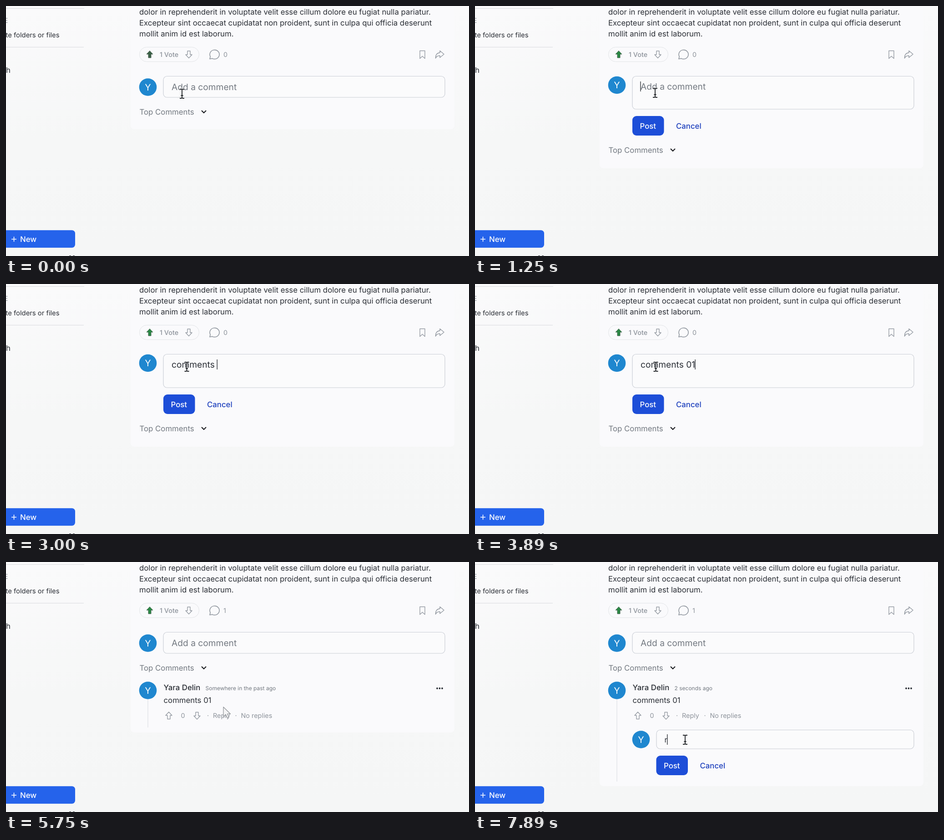
Write an HTML page that moves like this. It is 1018 px wide and 550 px high and loops after 8000 ms.

```html
<!DOCTYPE html>
<html lang="en">
<head>
<meta charset="utf-8">
<title>Comment thread</title>
<style>
html, body { margin: 0; width: 100%; height: 100%; overflow: hidden; background: #f6f7f7; }
svg { display: block; width: 1018px; height: 550px; }
text { font: 16.8px Inter, "Noto Sans", sans-serif; fill: #2a2e35; white-space: pre; text-rendering: geometricPrecision; }
.input { font-size: 19.2px; }
.small { font-size: 14.4px; }
.side { font-size: 14.8px; }
.tiny { font-size: 12px; }
.medium { font-weight: 500; }
.muted { fill: #737981; }
.soft { fill: #8d939b; }
.white { fill: #fff; }
.link { fill: #1e40bd; }
.avatar circle { fill: #1f87cf; }
.avatar text { font-size: 19.8px; fill: #fff; text-anchor: middle; }
.icon { fill: none; stroke: #969ca4; stroke-width: 1.4; stroke-linejoin: round; stroke-linecap: round; }
.field { fill: #fbfbfc; stroke: #cbcfd6; stroke-width: 1.2; }
.rule { stroke: #d9dbdf; }
.caret { stroke: #30343a; stroke-width: 1.4; }
</style>
</head>
<body>
<svg viewBox="0 0 1018 550">
  <defs>
    <linearGradient id="page" x2="0" y2="1">
      <stop stop-color="#fafafb"/>
      <stop offset=".55" stop-color="#f6f7f7"/>
      <stop offset="1" stop-color="#f5f6f6"/>
    </linearGradient>
    <path id="up" d="M0-8 7-.5H3V7.5H-3V-.5H-7Z"/>
    <path id="chevron" d="M-5-2.5 0 2.5 5-2.5" fill="none" stroke="#17191d" stroke-width="2"/>
    <g id="avatar" class="avatar"><circle r="19.3"/><text y="7">Y</text></g>
    <g id="post">
      <rect width="69.5" height="43" rx="9" fill="#1d4ed8"/>
      <text class="medium white" x="16.5" y="27.5">Post</text>
      <text class="medium link" x="96" y="27.5">Cancel</text>
    </g>
  </defs>
  <rect width="1018" height="550" fill="url(#page)"/>

  <!-- sidebar -->
  <path class="rule" d="M0 5.5H172M0 90.5H171"/>
  <text class="small soft" x="4.5" y="36.5" text-anchor="end">E</text>
  <text class="side" x="117.5" y="69" text-anchor="end">te folders or files</text>
  <text x="10" y="147" text-anchor="end">h</text>
  <rect x="-20" y="493.3" width="172" height="38.4" rx="7" fill="#2563eb"/>
  <path d="M12 513H23M17.5 507.5V518.5" stroke="#fff" stroke-width="1.6"/>
  <text class="medium white" x="31" y="518.5">New</text>
  <path d="M139 549.5H143M147 549.5H151" stroke="#2a2e35"/>

  <!-- post -->
  <rect id="card" x="274" y="-20" width="712" rx="8" fill="#fafafc"/>
  <text x="293" y="19">dolor in reprehenderit in voluptate velit esse cillum dolore eu fugiat nulla pariatur.</text>
  <text x="293" y="43">Excepteur sint occaecat cupidatat non proident, sunt in culpa qui officia deserunt</text>
  <text x="293" y="67">mollit anim id est laborum.</text>
  <rect x="293.5" y="90.5" width="131" height="32" rx="16" fill="none" stroke="#e2e4e7"/>
  <use id="vote" href="#up" x="316" y="106.5" stroke-width=".8"/>
  <text class="small soft medium" x="338" y="111.5">1 Vote</text>
  <use class="icon" href="#up" transform="translate(402 106.5) rotate(180)"/>
  <path class="icon" style="stroke-width:1.7" d="M448 116.5 449.3 111.3A10.5 10 0 1 1 453.5 115.4Z"/>
  <text id="count" class="small soft" x="478" y="111.5"></text>
  <path class="icon" d="M910 98.5H921V115.5L915.5 110.5 910 115.5Z"/>
  <path class="icon" style="stroke-width:1.5" d="M954 98.5 963 106 954 113.5V109.3C949 109 946.5 111 944.5 115 944.5 107 948 103 954 102.7Z"/>

  <!-- comment box -->
  <use id="me" href="#avatar" x="312"/>
  <rect id="box" class="field" x="346" y="154.5" width="619" rx="8"/>
  <text id="draft" class="input" x="364"></text>
  <line id="caret" class="caret" y1="166" y2="188"/>
  <use id="boxPost" href="#post" x="346"/>
  <g id="sort">
    <text class="muted" x="293.5" y="6">Top Comments</text>
    <use href="#chevron" x="435" y="0"/>
  </g>

  <!-- posted comment -->
  <g id="thread">
    <line id="stem" x1="312" x2="312" y1="302" stroke="#d7dade"/>
    <use href="#avatar" x="312" y="282.5"/>
    <text class="medium" x="346.5" y="281.5">Yara Delin</text>
    <text id="age" class="tiny muted" x="438.5" y="281.5"></text>
    <g fill="#2a2e35"><circle cx="948" cy="278" r="1.9"/><circle cx="953.5" cy="278" r="1.9"/><circle cx="959" cy="278" r="1.9"/></g>
    <text x="346.5" y="310">comments 01</text>
    <use class="icon" href="#up" x="358" y="338"/>
    <text class="small soft" x="389" y="343" text-anchor="middle">0</text>
    <use class="icon" href="#up" transform="translate(420 338) rotate(180)"/>
    <text class="small soft" x="442" y="343">·</text>
    <text id="reply" class="small soft" x="455" y="343">Reply</text>
    <text class="small soft" x="503.5" y="343">·</text>
    <text class="small soft" x="516.5" y="343">No replies</text>
  </g>

  <!-- reply box -->
  <g id="replyForm">
    <use href="#avatar" x="365" y="390.5"/>
    <rect class="field" x="399" y="369.5" width="566" height="41.5" rx="8"/>
    <text id="answer" x="416.5"></text>
    <line id="replyCaret" class="caret" y1="379" y2="402"/>
    <use href="#post" x="398.5" y="426"/>
  </g>

  <!-- pointers -->
  <g id="beam" fill="none">
    <path d="M-5-10H-2Q0-10 0-8Q0-10 2-10H5M0-8V8M-5 10H-2Q0 10 0 8Q0 10 2 10H5M-2.5 4H2.5" stroke="#fff" stroke-width="3.4"/>
    <path d="M-5-10H-2Q0-10 0-8Q0-10 2-10H5M0-8V8M-5 10H-2Q0 10 0 8Q0 10 2 10H5M-2.5 4H2.5" stroke="#24272b" stroke-width="1.9"/>
  </g>
  <path id="arrow" d="M0 0V21L5 16.5 8.5 24 12 22.5 8.8 15.2H15.5Z" fill="#f4f4f5" stroke="#8b8f94" stroke-width="1.2" stroke-linejoin="round"/>
  <path id="hand" d="M-2 2Q-2 0 0 0T2 2V9Q4 7.5 5.5 9.5 7.5 8.2 8.8 10.3 11.5 9.4 12 12V18Q11.5 22 9 26H0Q-2 23 -3 20L-6 15.5Q-7 13 -5 12.7-3.5 12.5 -2 15Z" fill="#fcfcfd" stroke="#54585e" stroke-width="1.3" stroke-linejoin="round"/>
</svg>
<script>
const LOOP = 8000;
const OPEN = 1000, SENT = 4130, REPLY = 6650, ANSWER = 7780;
const $ = id => document.getElementById(id);
const set = (id, attrs) => { for (const k in attrs) $(id).setAttribute(k, attrs[k]); };
const show = (id, on) => { $(id).style.display = on ? '' : 'none'; };

// Pointer path: time, x, y
const path = [
  [0, 387, 193], [770, 387, 193], [1250, 396, 191], [1500, 396, 191], [1900, 397.5, 182],
  [5130, 397.5, 182], [5750, 478, 319], [6100, 484, 345], [6950, 484, 345], [7390, 462, 391], [LOOP, 462, 391]
];

function pointer(t) {
  const i = path.findIndex(p => p[0] > t);
  const [t0, x0, y0] = path[i - 1], [t1, x1, y1] = path[i];
  const p = (t - t0) / (t1 - t0), e = p * p * (3 - 2 * p);
  return [x0 + (x1 - x0) * e, y0 + (y1 - y0) * e];
}

function typed(t) {
  if (t >= 3620) return 'comments 01';
  if (t >= 3500) return 'comments 0';
  return 'comments '.slice(0, Math.max(0, Math.floor((t - 2000) / 108) + 1));
}

function field(id, caret, value, hint) {
  const el = $(id);
  el.textContent = value || hint;
  el.style.fill = value ? '#2a2e35' : '#737981';
  const x = +el.getAttribute('x') + (value ? el.getComputedTextLength() : 0);
  set(caret, { x1: x, x2: x });
}

function draw(t) {
  const open = t >= OPEN && t < SENT, sent = t >= SENT, replying = t >= REPLY;
  const text = open ? typed(t) : '';
  const grow = text ? 1 : 0;

  set('card', { height: 20 + (replying ? 493 : sent ? 375 : open ? 357 + grow : 271) });
  set('vote', { fill: t < 770 ? '#3b6146' : '#2a8844', stroke: '#42574a' });
  $('count').textContent = sent ? 1 : 0;
  set('me', { y: open ? 174 : 178.5 });
  set('box', { height: open ? 72.5 + grow : 46.5 });
  set('draft', { y: open ? 183.5 : 185 });
  field('draft', 'caret', text, 'Add a comment');
  show('caret', open);
  show('boxPost', open);
  set('boxPost', { y: 242 + grow });
  set('sort', { transform: `translate(0 ${open ? 316.5 + grow : 232.5})` });

  show('thread', sent);
  set('stem', { y2: replying ? 483 : 364 });
  $('age').textContent = replying ? '2 seconds ago' : 'Somewhere in the past ago';
  show('replyForm', replying);
  const answer = t >= ANSWER ? 'r' : '';
  set('answer', { y: answer ? 396.5 : 395 });
  field('answer', 'replyCaret', answer, 'Writing a reply');

  const [x, y] = pointer(t);
  const overReply = sent && x > 455 && x < 493 && y > 330 && y < 352;
  const overField = y < 201 || (replying && y > 369);
  const shape = overReply ? 'hand' : overField ? 'beam' : 'arrow';
  for (const id of ['beam', 'arrow', 'hand']) show(id, id === shape);
  set(shape, { transform: `translate(${x} ${y})` });
  $('reply').style.fill = overReply ? '#a3abb8' : '';
}

const start = performance.now();
function tick() {
  draw((performance.now() - start) % LOOP);
  requestAnimationFrame(tick);
}
tick();
</script>
</body>
</html>
```
